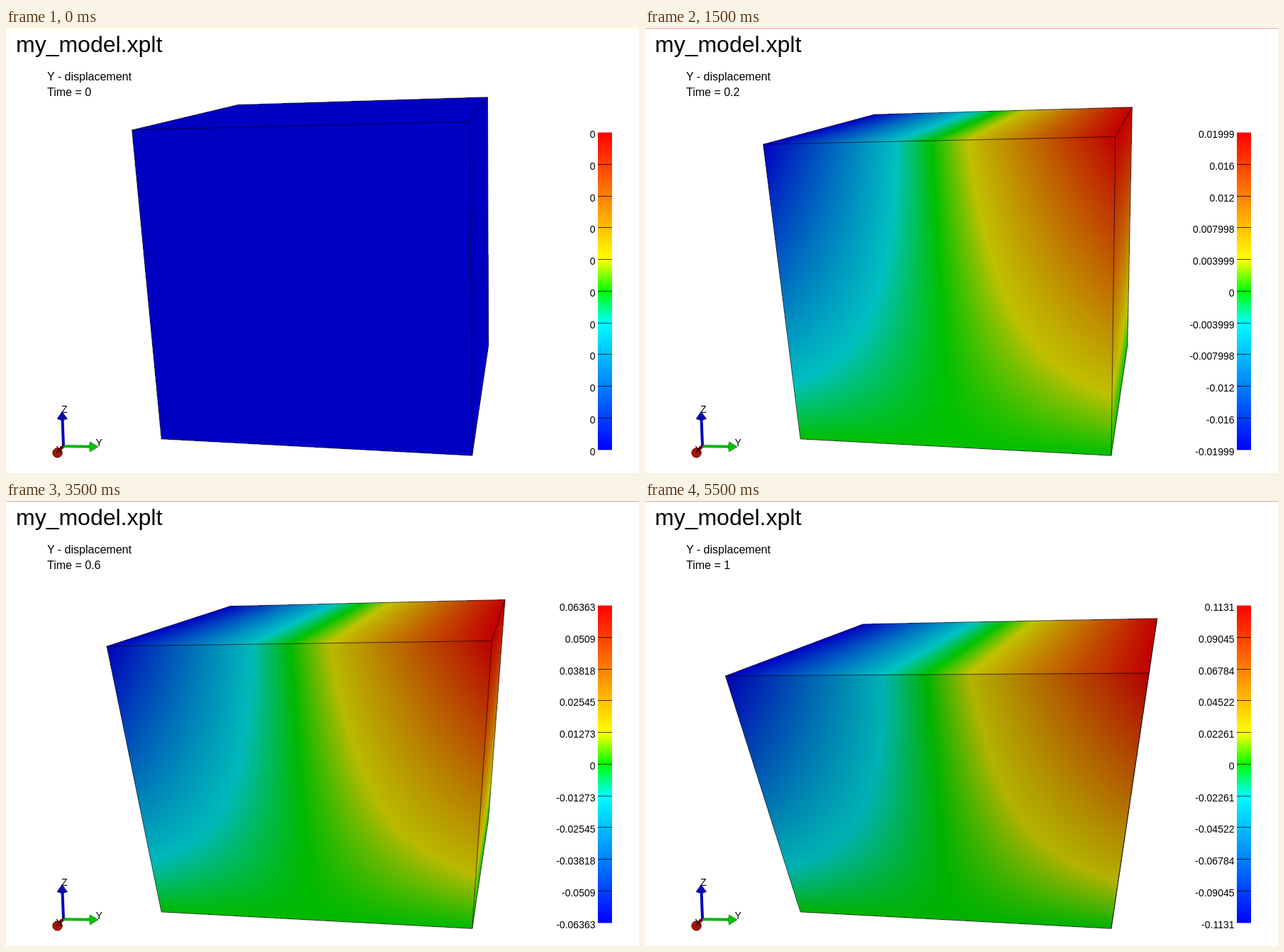
Write an HTML page with a canvas that moves like this. It is 892 px wide and 628 px high and loops after 6 s.

```html
<!DOCTYPE html>
<html lang="en">
<head>
<meta charset="utf-8">
<title>Y - displacement</title>
<style>
  html, body { margin: 0; width: 100%; height: 100%; overflow: hidden; background: #fff; }
  canvas, svg { position: absolute; left: 0; top: 0; width: 892px; height: 628px; }
  text { font-family: "Liberation Sans", Arial, sans-serif; font-size: 14px; fill: #000; }
</style>
</head>
<body>
<canvas id="view" width="892" height="628"></canvas>
<svg viewBox="0 0 892 628">
  <defs>
    <linearGradient id="map" x1="0" y1="0" x2="0" y2="1">
      <stop offset="0" stop-color="#f00"/>
      <stop offset=".4" stop-color="#ff0"/>
      <stop offset=".5" stop-color="#0f0"/>
      <stop offset=".6" stop-color="#0ff"/>
      <stop offset="1" stop-color="#00f"/>
    </linearGradient>
  </defs>
  <rect id="strip" width="892" height="1"/>
  <text x="14" y="34" style="font-size:32px">my_model.xplt</text>
  <text x="58" y="74" style="font-size:16px">Y - displacement</text>
  <text id="time" x="58" y="95.5" style="font-size:16px"></text>

  <rect x="834" y="147.5" width="20" height="448" fill="url(#map)"/>
  <g id="legend" text-anchor="end"></g>
  <g id="scale">
    <text x="834" y="144">x10</text>
    <text x="857" y="136.5" style="font-size:10.5px">-3</text>
  </g>

  <g>
    <path d="M81 590L79.5 552" stroke="#0000b8" stroke-width="4"/>
    <path d="M79 541.5L72 551.5Q79 555 86.500 551.5Z" fill="#0808b4" stroke="#000070" stroke-width=".6"/>
    <path d="M82 590.3L119 590.8" stroke="#00b400" stroke-width="4"/>
    <path d="M130 591L118.500 584Q116.500 591 118.500 598Z" fill="#08c408" stroke="#006000" stroke-width=".6"/>
    <path d="M81 590L74 597" stroke="#7a0800" stroke-width="4"/>
    <circle cx="72.500" cy="599.500" r="6.800" fill="#a81404" stroke="#500800" stroke-width=".8"/>
    <text x="78" y="542.500">Z</text>
    <text x="126.500" y="589.500">Y</text>
    <text x="70" y="600">X</text>
  </g>
</svg>
<script>
const $ = id => document.getElementById(id);
const ctx = $("view").getContext("2d");
const LOOP = 6000, STEP = 500;

// Largest sideways displacement at each tenth of the load
const peaks = [0, .009858, .019994, .030424, .04116, .05222, .06363, .07539, .087536, .10008, .11306];

// Camera: homogeneous screen position of the base corner and the cube axes
const base = [219, 580, 1];
const ax = [-244.2, -2.8, -.3278];
const ay = [389.9, -20.7, -.0732];
const az = [-55.6, -447.45, -.0795];

const add = (p, q, k = 1) => p.map((v, i) => v + k * q[i]);
const point = (x, y, z) => add(add(add(base, ax, x), ay, y), az, z);
const flat = ([x, y, w]) => [x / w, y / w];
const inside = v => v >= 0 && v <= 1;
const clamp = v => Math.max(0, Math.min(1, v));

// Value from -1 to 1: blue, cyan, green, yellow, red
function color(v) {
  const near = Math.abs(v) <= .2;
  const side = near ? Math.abs(v) * 5 : 1;
  const green = near ? 1 : clamp((1 - Math.abs(v)) / .8);
  return v > 0 ? [side, green, 0] : [0, green, side];
}

// Each face lies in a plane o + a*u + b*v; hit() gives the value there or null
function faces(d, h, s) {
  const lean = (u, b) => (u + d * b) / (1 + 2 * d * b);
  return [
    { o: add(base, az, h), u: ay, v: ax, shade: .76,
      hit: (a, b) => inside(lean(a, 1)) && inside(lean(b + 1, 1)) ? 2 * lean(a, 1) - 1 : null },
    { o: base, u: ay, v: add(az.map(k => k * h), ax, d), shade: .765 - .065 * s,
      hit: (a, b) => inside(b) && inside(lean(a, b)) ? (2 * lean(a, b) - 1) * b : null },
    { o: add(base, ay), u: ax, v: add(az.map(k => k * h), ay, d), shade: .76,
      hit: (a, b) => inside(b) && inside(lean(a + 1, b)) ? b : null }
  ];
}

// Parameters of the plane point seen through a pixel
function solve({ o, u, v }, x, y) {
  const p = o[0] - x * o[2], q = o[1] - y * o[2];
  const a = u[0] - x * u[2], b = v[0] - x * v[2];
  const c = u[1] - y * u[2], e = v[1] - y * v[2];
  const det = a * e - b * c;
  return [(b * q - p * e) / det, (c * p - a * q) / det];
}

function drawCube(n) {
  const s = n / 10, d = peaks[n], h = 1 - .2 * s;
  const left = 100, top = 85, w = 640, tall = 530;
  const img = ctx.createImageData(w, tall);
  const list = faces(d, h, s);
  for (let j = 0; j < tall; j++) for (let i = 0; i < w; i++) {
    for (const f of list) {
      const [a, b] = solve(f, left + i + .5, top + j + .5);
      const val = f.hit(a, b);
      if (val === null) continue;
      const rgb = color(n ? val : -1);
      const at = (j * w + i) * 4;
      for (let k = 0; k < 3; k++) img.data[at + k] = rgb[k] * f.shade * 255;
      img.data[at + 3] = 255;
      break;
    }
  }
  ctx.clearRect(0, 0, 892, 628);
  ctx.putImageData(img, left, top);

  const A = flat(point(d, -d, h)), B = flat(point(-1 - d, -d, h));
  const C = flat(point(-1 - d, 1 + d, h)), D = flat(point(d, 1 + d, h));
  const E = flat(base), F = flat(point(0, 1, 0)), G = flat(point(-1, 1, 0));
  ctx.beginPath();
  for (const line of [[A, B, C, D, A, E, F, D], [F, G, C]])
    line.forEach((p, i) => i ? ctx.lineTo(...p) : ctx.moveTo(...p));
  ctx.strokeStyle = "rgba(0,0,0,.65)";
  ctx.lineWidth = 1;
  ctx.lineJoin = "round";
  ctx.stroke();
}

function make(tag, attrs) {
  const el = document.createElementNS("http://www.w3.org/2000/svg", tag);
  for (const k in attrs) el.setAttribute(k, attrs[k]);
  return $("legend").appendChild(el);
}

const labels = [];
for (let i = 0; i <= 10; i++) {
  const y = 147.7 + i * 44.75;
  labels.push(make("text", { x: 830.5, y: y + 7.3 }));
  if (i % 10) make("rect", { x: 834, y: Math.floor(y), width: 20, height: 1, fill: "#000", opacity: .75 });
}

function show(n) {
  const small = n > 0 && peaks[n] < .01;
  const max = peaks[n] * (small ? 1000 : 1);
  labels.forEach((el, i) => {
    el.textContent = i === 5 ? "0" : String(Number((max * (5 - i) / 5).toPrecision(4)));
  });
  $("scale").style.display = small ? "" : "none";
  $("time").textContent = "Time = " + n / 10;
  drawCube(n);
}

let shown = -1;
const start = performance.now();
function tick() {
  const t = (performance.now() - start) % LOOP;
  const n = Math.max(0, Math.floor(t / STEP) - 1);
  $("strip").setAttribute("fill", t < STEP ? "#ffffb4" : "#ff9f95");
  if (n !== shown) show(shown = n);
  requestAnimationFrame(tick);
}
tick();
</script>
</body>
</html>
```
